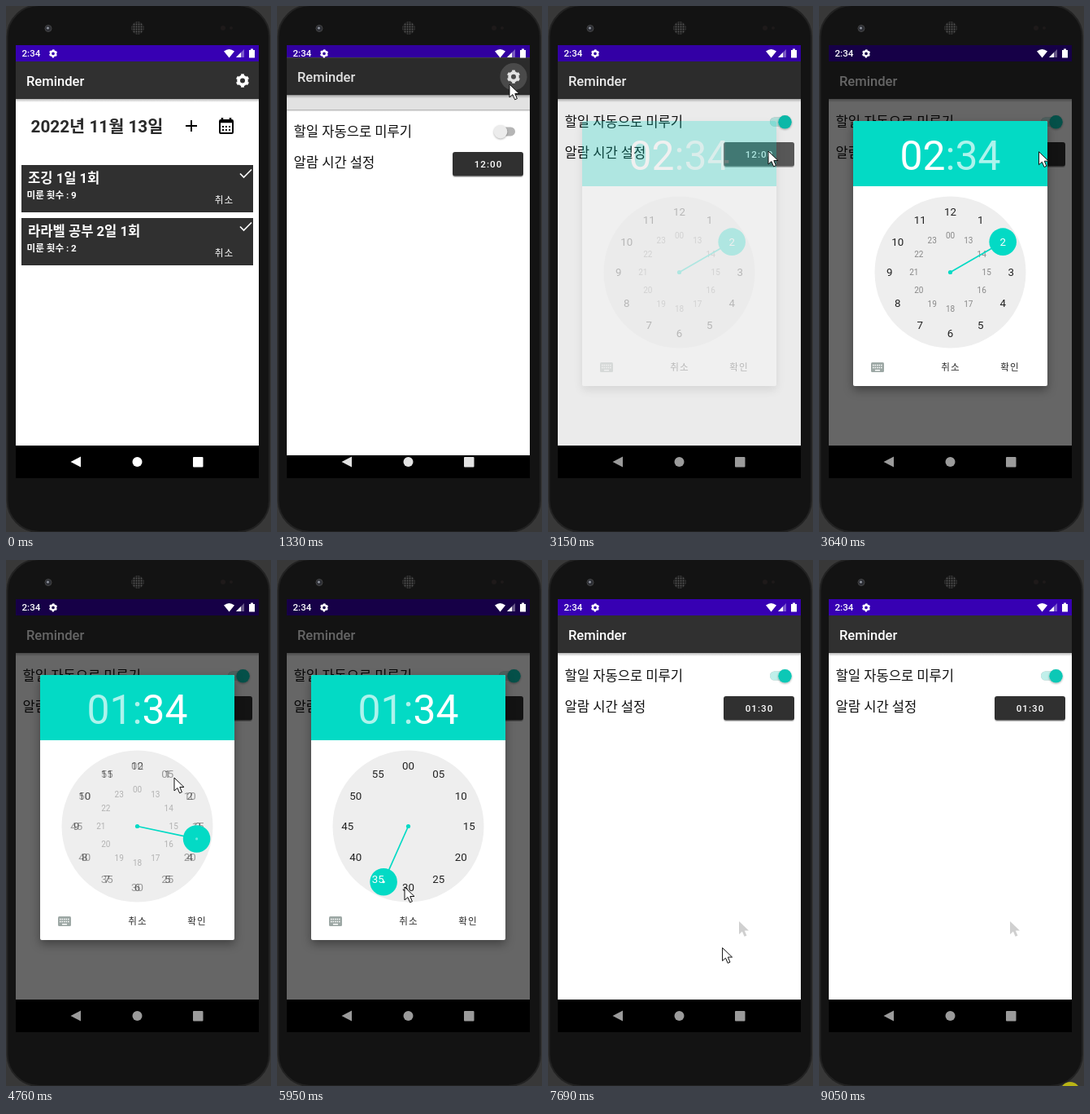
Animation of 326x645 px, one loop 9.12 s. Source, as an HTML page:

```html
<!DOCTYPE html>
<html lang="ko">
<head>
<meta charset="utf-8">
<title>Reminder</title>
<style>
  html, body { margin: 0; width: 100%; height: 100%; overflow: hidden; background: #2c2c2c; }
  svg { display: block; width: 326px; height: 645px; }
  text { font-family: Roboto, "Noto Sans CJK KR", "Noto Sans CJK", sans-serif; white-space: pre; }
  .title { font-size: 16.6px; font-weight: 500; fill: #fff; }
  .label { font-size: 16.6px; fill: #111; }
  .card { font-size: 16.6px; font-weight: 700; fill: #fff; }
  .small { font-size: 11.6px; font-weight: 700; fill: #fff; }
  .button { font-size: 11.6px; font-weight: 500; letter-spacing: 1.04px; fill: #fff; }
  .mid { text-anchor: middle; }
  .dark { fill: #303030; }
  #dialog .button { fill: #2a2a2a; }
  #dialogBox { filter: drop-shadow(0 5px 6px rgba(0,0,0,.35)); }
</style>
</head>
<body>
<svg viewBox="0 0 326 645">
  <defs>
    <clipPath id="screenClip"><rect x="12" y="48" width="299" height="531"/></clipPath>
    <clipPath id="revealClip"><rect id="reveal" x="12" y="48" width="299" height="531"/></clipPath>
    <clipPath id="pickClip"><circle id="pickArea" r="16.8"/></clipPath>
    <pattern id="mesh" width="3" height="3" patternUnits="userSpaceOnUse">
      <rect width="3" height="3" fill="#1b1b1b"/><circle cx="1.5" cy="1.5" r=".9" fill="#555"/>
    </pattern>
    <linearGradient id="shade" x2="0" y2="1">
      <stop stop-opacity=".28"/><stop offset="1" stop-opacity="0"/>
    </linearGradient>
    <g id="gear" fill="none" stroke="#fff">
      <circle r="4.9" stroke-width="3.8"/>
      <circle r="7" stroke-width="2.4" pathLength="12" stroke-dasharray="1 1" transform="rotate(15)"/>
    </g>
    <g id="chrome">
      <rect x="12" y="48" width="299" height="531" fill="#000"/>
      <rect x="12" y="68" width="299" height="471" fill="#fff"/>
      <rect x="12" y="48" width="299" height="20" fill="#3700b3"/>
      <rect x="12" y="114" width="299" height="4" fill="url(#shade)"/>
      <rect class="dark" x="12" y="68" width="299" height="46"/>
      <text class="title" x="25" y="97.8">Reminder</text>
    </g>
    <g id="cardBox">
      <rect class="dark" x="19" y="195" width="285" height="58"/>
      <path d="M288 205.5l4.5 4.5 9.500-9.500" fill="none" stroke="#fff" stroke-width="1.7"/>
      <text class="button mid" x="268.500" y="242">취소</text>
    </g>
    <path id="arrow" d="M0 0V16L3.900 12.600 6.600 18.800 9.400 17.600 6.800 11.500H12Z"/>
  </defs>

  <rect width="326" height="645" fill="#383838"/>
  <rect x="1.500" y="-1" width="322.500" height="646" rx="39" fill="#131313" stroke="#222" stroke-width="2"/>
  <circle cx="52" cy="27.500" r="4" fill="#2b2d33" stroke="#444"/>
  <circle cx="51.500" cy="27" r="1.600" fill="#8c909a"/>
  <circle cx="162" cy="27" r="7.700" fill="url(#mesh)"/>
  <g fill="#1e1a1a"><circle cx="267" cy="27" r="3"/><circle cx="277" cy="27" r="2"/></g>

  <g clip-path="url(#screenClip)">
    <g id="home">
      <use href="#chrome"/>
      <circle id="ripple" fill="#fff" fill-opacity=".17"/>
      <use href="#gear" transform="translate(291 91.500)"/>
      <text x="30.500" y="154.500" font-size="20.75" font-weight="700" fill="#2a2a2a">2022년 11월 13일</text>
      <path d="M221 147h14M228 140v14" stroke="#000" stroke-width="2"/>
      <g transform="translate(271 147)">
        <rect x="-8" y="-7" width="16" height="16" rx="1.200" fill="none" stroke="#000" stroke-width="2"/>
        <path d="M-8 -5H8M-5 -10v4M5 -10v4" stroke="#000" stroke-width="2.500"/>
        <path d="M-5 1H6M-5 5H6" stroke="#000" stroke-width="2" stroke-dasharray="2 2"/>
      </g>
      <use href="#cardBox"/>
      <text class="card" x="27" y="216.500">조깅 1일 1회</text>
      <text class="small" x="25.500" y="236">미룬 횟수 : 9</text>
      <use href="#cardBox" y="65"/>
      <text class="card" x="27" y="281.500">라라벨 공부 2일 1회</text>
      <text class="small" x="25.500" y="301">미룬 횟수 : 2</text>
      <rect id="homeShade" x="12" y="48" width="299" height="560"/>
    </g>

    <g id="settingsView" clip-path="url(#revealClip)">
      <g id="settings">
        <use href="#chrome"/>
        <text class="label" x="20.500" y="148">할일 자동으로 미루기</text>
        <text class="label" x="20.500" y="186">알람 시간 설정</text>
        <rect x="273" y="136.500" width="20" height="11" rx="5.500" fill="#b5b5b5"/>
        <rect class="on" x="273" y="136.500" width="20" height="11" rx="5.500" fill="#c0efea"/>
        <g id="thumb" style="filter:drop-shadow(0 1px 1px rgba(0,0,0,.3))">
          <circle cy="142.300" r="8.300" fill="#ececec"/>
          <circle class="on" cy="142.300" r="8.300" fill="#0cc8b6"/>
        </g>
        <rect x="216" y="168" width="87" height="30" rx="3" fill-opacity=".25"/>
        <rect class="dark" x="216" y="167" width="87" height="29.500" rx="3"/>
        <rect id="press" x="216" y="167" width="87" height="29.500" rx="3" fill="#fff"/>
        <text id="alarm" class="button mid" x="260" y="186"></text>
      </g>
    </g>
    <rect id="scrim" x="12" y="48" width="299" height="491"/>
  </g>

  <g fill="#fff">
    <text x="19.500" y="62.200" font-size="11.600" font-weight="500">2:34</text>
    <use href="#gear" transform="translate(58 58.300) scale(.62)"/>
    <path d="M268 55.500Q274.500 50.500 281 55.500L274.500 63.500Z"/>
    <path d="M293 53V63H283Z" opacity=".35"/>
    <path d="M289 57V63H283Z"/>
    <path d="M299 54h2v-1.500h3v1.500h2v9.500h-7z"/>
  </g>
  <g id="nav">
    <path d="M79.500 559L92 552.500V565.500Z"/>
    <circle cx="161.500" cy="559" r="6"/>
    <rect x="230" y="553" width="12.500" height="12.500" rx="1"/>
  </g>

  <g id="dialog">
    <rect id="dialogBox" x="42" y="141" width="239" height="325" rx="2" fill="#fff"/>
    <path d="M42 221V143q0-2 2-2H279q2 0 2 2V221Z" fill="#03dac5"/>
    <text class="mid" x="161.500" y="201" font-size="49.800" fill="#fff"><tspan id="hour"></tspan><tspan fill-opacity=".68">:</tspan><tspan id="minute"></tspan></text>
    <circle cx="161.500" cy="326.500" r="93" fill="#eee"/>
    <g id="hours"></g>
    <g id="minutes"></g>
    <path id="hand" stroke="#03dac5" stroke-width="1.700"/>
    <circle cx="161.500" cy="326.500" r="2.600" fill="#03dac5"/>
    <circle id="knob" r="16.800" fill="#03dac5"/>
    <g clip-path="url(#pickClip)"><text id="picked" class="mid" font-size="13.300" fill="#fff"></text></g>
    <circle id="dot" r="1.600" fill="#fff"/>
    <rect x="64" y="437" width="16" height="12" rx="1.500" fill="#9da8a5"/>
    <path d="M66 440.500H78M66 443.500H78" stroke="#fff" stroke-width="1.500" stroke-dasharray="1.500 1"/>
    <path d="M69 446.700H75" stroke="#fff" stroke-width="1.400"/>
    <rect id="okPress" x="212" y="428" width="44" height="31" rx="15" fill-opacity=".12"/>
    <text class="button mid" x="162" y="447.300">취소</text>
    <text class="button mid" x="235" y="447.300">확인</text>
  </g>

  <use id="ghost" href="#arrow" x="235" y="443" fill="#c4c4c4" opacity=".8"/>
  <use id="cursor" href="#arrow" fill="#fff" stroke="#111" stroke-width="1"/>
  <circle id="spot" cx="309" cy="652.500" r="12.500" fill="#b9b416"/>
</svg>

<script>
const LOOP = 9120, CX = 161.5, CY = 326.5, RING = 74.7;
const el = id => document.getElementById(id);
const set = (id, attrs) => { for (const k in attrs) el(id).setAttribute(k, attrs[k]); };
const show = (id, visible) => set(id, { visibility: visible ? "visible" : "hidden" });
const progress = (t, start, length) => Math.min(1, Math.max(0, (t - start) / length));
const lerp = (a, b, p) => a + (b - a) * p;
const smooth = p => p * p * (3 - 2 * p);
const easeOut = (p, power) => 1 - (1 - p) ** power;
const two = n => String(n).padStart(2, "0");

function onDial(degrees, radius) {
  const a = degrees * Math.PI / 180;
  return [CX + radius * Math.sin(a), CY - radius * Math.cos(a)];
}

function addRing(id, radius, size, color, caption) {
  for (let i = 0; i < 12; i++) {
    const [x, y] = onDial(i * 30, radius);
    const label = document.createElementNS("http://www.w3.org/2000/svg", "text");
    label.setAttribute("class", "mid");
    label.setAttribute("x", x);
    label.setAttribute("y", y + size * .355);
    label.setAttribute("font-size", size);
    label.setAttribute("fill", color);
    label.textContent = caption(i);
    el(id).append(label);
  }
}
addRing("hours", RING, 13.3, "#222", i => i || 12);
addRing("hours", 44.7, 10, "#888", i => i ? i + 12 : "00");
addRing("minutes", RING, 13.3, "#222", i => two(i * 5));

// time, x, y of the pointer's tip
const route = [
  [180, 268, 535], [760, 286, 96], [1640, 286, 96], [2100, 281, 138],
  [2480, 281, 138], [2900, 271, 178], [3600, 271, 178], [4380, 207, 267],
  [4960, 207, 267], [5470, 152, 303], [5610, 120, 372], [5750, 157, 401],
  [6150, 157, 401], [6720, 235, 443], [7250, 235, 443], [7900, 208, 486],
  [8250, 204, 565], [8620, 322, 648]
];
function pointer(t) {
  let i = 1;
  while (i < route.length - 1 && t > route[i][0]) i++;
  const [t0, x0, y0] = route[i - 1], [t1, x1, y1] = route[i];
  const p = smooth(progress(t, t0, t1 - t0));
  return [lerp(x0, x1, p), lerp(y0, y1, p)];
}

function drawWindows(t) {
  const touch = easeOut(progress(t, 930, 270), 2);
  set("ripple", { cx: lerp(284, 291, touch), cy: lerp(95.5, 91.5, touch), r: lerp(10, 16.6, touch) });
  show("ripple", t >= 980);

  const open = progress(t, 1190, 425), slide = easeOut(open, 1.5);
  set("home", { transform: `translate(0 ${-10.6 * slide})` });
  set("homeShade", { opacity: .25 * slide });
  show("settingsView", open > 0);
  set("reveal", { y: 48 + 531 * (1 - easeOut(open, 4.7)) });
  set("settings", { transform: `translate(0 ${21.8 * (1 - slide)})` });
  set("nav", { fill: `rgb(${Array(3).fill(lerp(255, 155, progress(t, 1190, 510)))})` });

  const on = smooth(progress(t, 2200, 250));
  set("thumb", { transform: `translate(${lerp(275, 291.5, on)} 0)` });
  document.querySelectorAll(".on").forEach(e => e.setAttribute("opacity", on));
  set("press", { opacity: .22 * progress(t, 2940, 140) * (1 - progress(t, 3200, 170)) });
  el("alarm").textContent = t < 6900 ? "12:00" : "01:30";
}

function drawDialog(t) {
  const enter = progress(t, 3080, 280);
  set("scrim", { opacity: .6 * enter ** 1.5 * (1 - progress(t, 6900, 210)) });
  set("dialog", { opacity: enter * (1 - progress(t, 6900, 150)) });

  const hour = t < 4400 ? 2 : 1, minute = t < 6020 ? 34 : 30;
  const minuteMode = t >= 4540, mix = smooth(progress(t, 4540, 500));
  el("hour").textContent = two(hour);
  el("minute").textContent = two(minute);
  set("hour", { "fill-opacity": minuteMode ? .68 : 1 });
  set("minute", { "fill-opacity": minuteMode ? 1 : .68 });
  set("hours", { opacity: 1 - mix });
  set("minutes", { opacity: mix });

  const angle = lerp(hour * 30, minute * 6, mix);
  const [x, y] = onDial(angle, RING), [hx, hy] = onDial(angle, RING - 16);
  set("hand", { d: `M${CX} ${CY}L${hx} ${hy}` });
  for (const id of ["knob", "pickArea", "dot"]) set(id, { cx: x, cy: y });
  set("dot", { opacity: minute % 5 ? mix : 0 });

  const index = minuteMode ? Math.round(minute / 5) : hour;
  const [lx, ly] = onDial(index * 30, RING);
  set("picked", { x: lx, y: ly + 13.3 * .355 });
  el("picked").textContent = minuteMode ? two(index * 5) : hour;
  set("okPress", { opacity: progress(t, 6750, 120) });
}

function frame(now) {
  const t = now % LOOP;
  drawWindows(t);
  drawDialog(t);
  const [x, y] = pointer(t);
  set("cursor", { x, y });
  show("cursor", t >= 200 && t < 8590);
  show("ghost", t >= 7300);
  show("spot", t >= 9050);
}

const start = performance.now();
function tick() {
  frame(performance.now() - start);
  requestAnimationFrame(tick);
}
tick();
</script>
</body>
</html>
```
